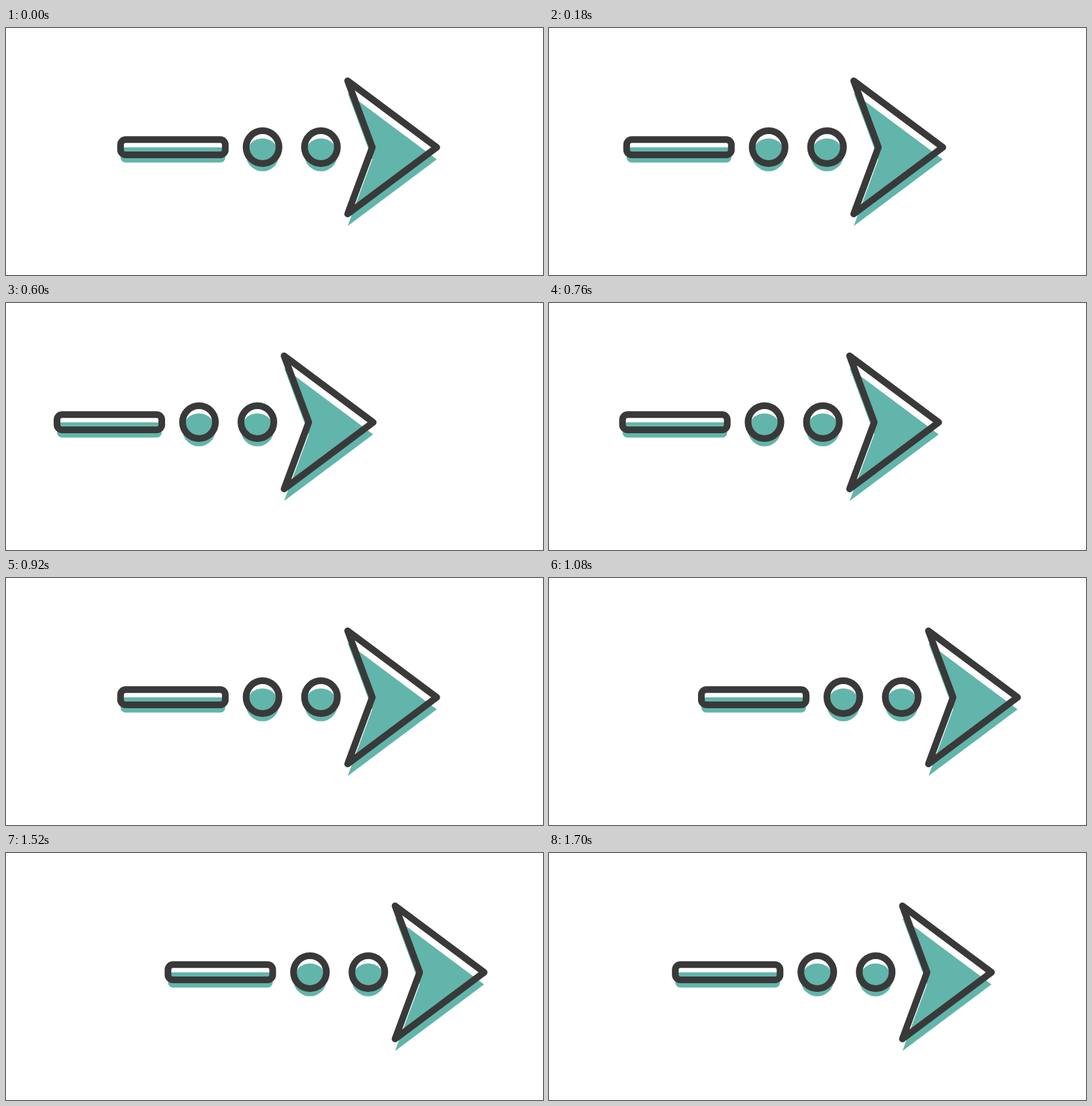
Animation of 800 by 368 pixels, one loop 1720 ms. Source, as an HTML page with a canvas:

```html
<!DOCTYPE html>
<html lang="en">
<head>
<meta charset="utf-8">
<title>Sliding arrow</title>
<style>
  html, body { margin: 0; width: 100%; height: 100%; overflow: hidden; background: #fff; }
  canvas { display: block; }
</style>
</head>
<body>
<canvas id="stage" width="800" height="368"></canvas>
<script>
const ctx = document.getElementById('stage').getContext('2d');
const TEAL = '#62b5aa', DARK = '#393939';
const LOOP = 1720, STEP = 20, HOLD = 60;
const LEFT = -102.3, RIGHT = 88.7;       // turning points of the slide
const T_LEFT = 480, T_RIGHT = 1331, LEG = 851;

function ease(x) {
  const p = 2.03;
  return x < 0.5 ? 0.5 * (2 * x) ** p : 1 - 0.5 * (2 - 2 * x) ** p;
}

function slide(t) {
  // the picture rests briefly at the start of each loop
  const at = t < HOLD ? 40 : Math.floor(t / STEP) * STEP;
  const k = at < T_RIGHT
    ? Math.abs(at - T_LEFT) / LEG
    : 1 - (at - T_RIGHT) / LEG;
  return LEFT + (RIGHT - LEFT) * ease(k);
}

function bar() {
  const p = new Path2D();
  p.roundRect(171, 166.3, 156, 22.6, 7.5);
  return p;
}

function ring(x) {
  const p = new Path2D();
  p.arc(x, 177.5, 24.5, 0, Math.PI * 2);
  return p;
}

function head() {
  return new Path2D('M509.3 78.7L642 177.7L509.3 277L546 177.7Z');
}

// each shape with the drop of its teal fill
const shapes = [
  [bar(), 11.5],
  [ring(382.5), 11.5],
  [ring(469.5), 11.5],
  [head(), 18]
];

function draw(t) {
  ctx.setTransform(1, 0, 0, 1, 0, 0);
  ctx.fillStyle = '#fff';
  ctx.fillRect(0, 0, 800, 368);
  ctx.translate(slide(t), 0);
  ctx.fillStyle = TEAL;
  ctx.strokeStyle = DARK;
  ctx.lineWidth = 10;
  ctx.lineJoin = 'round';
  for (const [path, drop] of shapes) {
    ctx.translate(0, drop);
    ctx.fill(path);
    ctx.translate(0, -drop);
    ctx.stroke(path);
  }
}

const start = performance.now();
function tick() {
  draw((performance.now() - start) % LOOP);
  requestAnimationFrame(tick);
}
tick();
</script>
</body>
</html>
```
